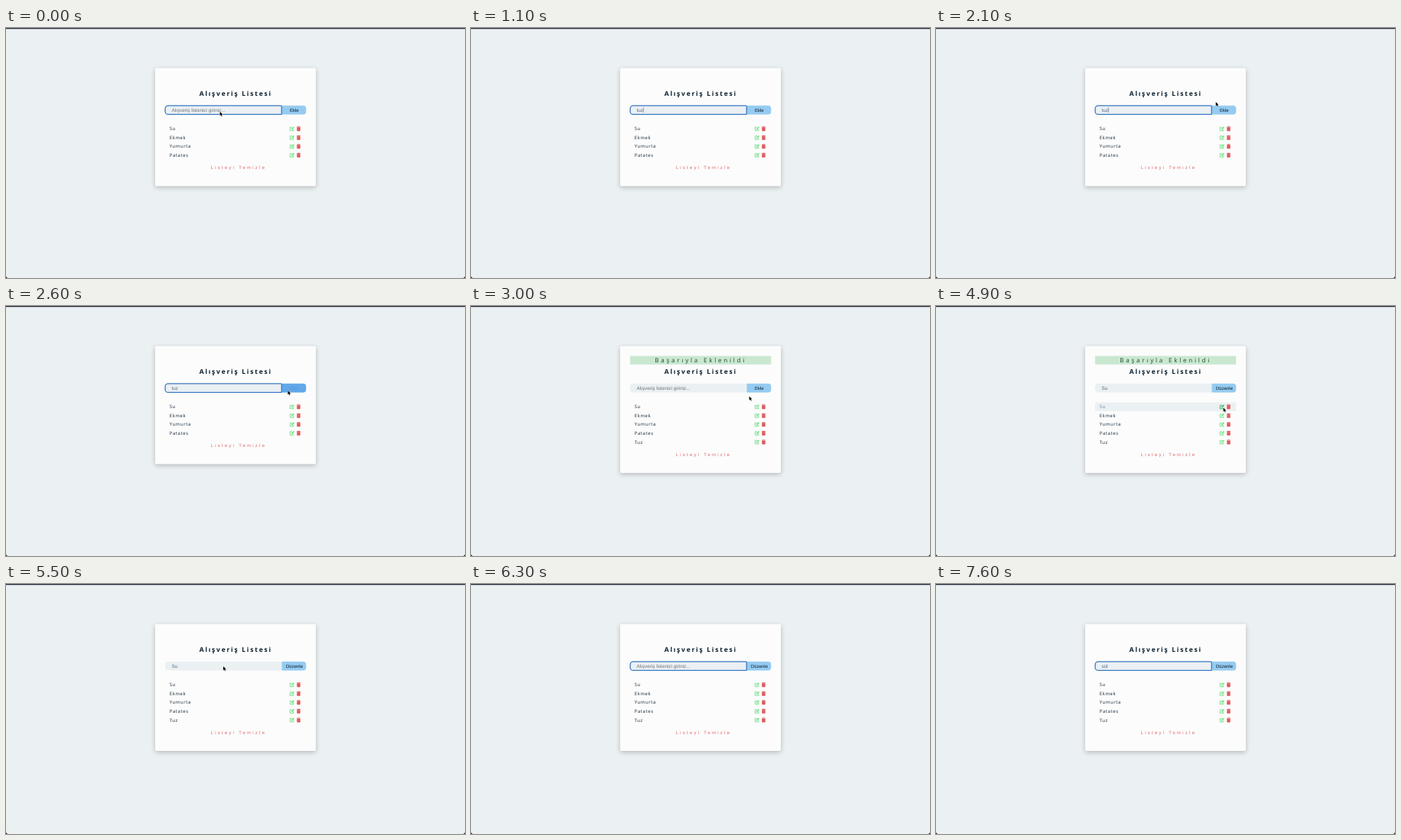
Animation of 600 by 328 pixels, one loop 8 s. Source, as an HTML page with a canvas:

```html
<!DOCTYPE html>
<html lang="tr">
<head>
<meta charset="utf-8">
<title>Alışveriş Listesi</title>
<style>
html, body { margin: 0; width: 100%; height: 100%; overflow: hidden; background: #ebf0f3; }
canvas { display: block; width: 600px; height: 328px; }
</style>
</head>
<body>
<canvas id="stage"></canvas>
<script>
const LOOP = 8000, STEP = 100, ROW = 11.55;
const SANS = '"Open Sans", sans-serif', UI = '"Liberation Sans", Arial, sans-serif';
const ITEMS = ['Su', 'Ekmek', 'Yumurta', 'Patates', 'Tuz'];
const HINT = 'Alışveriş listenizi giriniz...';

// [time, text in the field]
const TYPED = [[0, ''], [800, 't'], [1000, 'tu'], [1100, 'tuz'], [2800, ''], [4800, 'Su'],
  [6100, 'S'], [6200, ''], [6900, 's'], [7000, 'sü'], [7100, 'süt']];

// [time, x, y]; the pointer hides while typing
const PATHS = [
  [[0, 279.6, 109.8], [700, 279.6, 109.8]],
  [[1900, 282, 111], [2200, 395, 92], [2500, 368.4, 111], [2800, 368.4, 111],
   [3100, 362, 121], [3400, 362, 121], [3700, 353.8, 142.6], [3900, 354, 143],
   [4300, 375, 133], [4400, 375.6, 133.4], [5000, 375.6, 133.4], [5500, 284, 108], [6100, 284, 108]]
];

const canvas = document.getElementById('stage');
const c = canvas.getContext('2d');
const dpr = window.devicePixelRatio || 1;
canvas.width = 600 * dpr;
canvas.height = 328 * dpr;

const within = (t, a, b) => t >= a && t < b;

function box(x, y, w, h, r, fill) {
  c.beginPath();
  c.roundRect(x, y, w, h, r);
  c.fillStyle = fill;
  c.fill();
}

function text(str, x, y, size, color, family = UI, spacing = 0, weight = 400) {
  c.font = `${weight} ${size}px ${family}`;
  c.letterSpacing = spacing + 'px';
  c.textRendering = 'geometricPrecision';
  c.fillStyle = color;
  c.fillText(str, x, y);
  return c.measureText(str).width;
}

function typedAt(t) {
  let last = TYPED[0];
  for (const key of TYPED) if (key[0] <= t) last = key;
  return last;
}

function pointerAt(t) {
  const path = PATHS.find(p => within(t, p[0][0], p[p.length - 1][0]));
  if (!path) return null;
  const i = path.findIndex(p => p[0] > t);
  const [t0, x0, y0] = path[i - 1], [t1, x1, y1] = path[i];
  const k = (t - t0) / (t1 - t0), e = k * k * (3 - 2 * k);
  return { x: x0 + (x1 - x0) * e, y: y0 + (y1 - y0) * e };
}

function editIcon(x, y, color) {
  c.strokeStyle = c.fillStyle = color;
  c.lineWidth = 0.75;
  c.beginPath();
  c.moveTo(x + 3.3, y - 2);
  c.lineTo(x + 0.4, y - 2);
  c.lineTo(x + 0.4, y + 2.5);
  c.lineTo(x + 4.9, y + 2.5);
  c.lineTo(x + 4.9, y + 0.6);
  c.stroke();
  c.lineWidth = 1.3;
  c.beginPath();
  c.moveTo(x + 2.2, y + 0.9);
  c.lineTo(x + 5.5, y - 2.3);
  c.stroke();
}

function trashIcon(x, y) {
  const red = '#da4549';
  box(x, y - 2.6, 5, 0.8, 0.2, red);
  box(x + 1.5, y - 3, 2, 0.6, 0.2, red);
  box(x + 0.35, y - 1.5, 4.3, 4.5, [0, 0, 0.6, 0.6], red);
  for (let i = 0; i < 3; i++) box(x + 1.2 + i * 1.1, y - 0.8, 0.35, 3, 0, '#e98b8d');
}

function pointer({ x, y }) {
  const pts = [[0, 0], [0, 5.3], [1.3, 4.2], [2.2, 6.2], [3.1, 5.8], [2.2, 3.9], [3.8, 3.8]];
  c.beginPath();
  pts.forEach(([dx, dy]) => c.lineTo(x + dx, y + dy));
  c.closePath();
  c.lineJoin = 'round';
  c.lineWidth = 0.9;
  c.strokeStyle = '#fff';
  c.stroke();
  c.fillStyle = '#000';
  c.fill();
}

function field(t, mouse) {
  const focus = t < 2800 || t >= 5600;
  const [since, value] = typedAt(t);
  box(208, 101.8, 152.6, 11.8, [4, 0, 0, 4], '#ebf0f3');

  const over = mouse && mouse.x > 360.5 && mouse.x < 392 && within(mouse.y, 102, 113.5);
  box(360.5, 101.8, 31.8, 11.8, [0, 4, 4, 0], over ? '#62a8e8' : '#95cbf2');
  const edit = t >= 4800;
  text(edit ? 'Düzenle' : 'Ekle', edit ? 366 : 370.9, 109.7, 6, over ? '#549bdb' : '#0b1c2b');

  if (focus) {
    c.beginPath();
    c.roundRect(208.1, 101.9, 152.2, 11.5, [4, 1, 1, 4]);
    c.strokeStyle = '#3a7bc2';
    c.lineWidth = 1.3;
    c.stroke();
  }
  const w = text(value || HINT, 216.4, 109.7, 6.35, value ? '#566f88' : '#6b7378');
  const blink = Math.floor((t - since) / 500) % 2 === 0;
  if (focus && value && blink) box(216.5 + w, 104.2, 0.5, 6.8, 0, '#33495c');
}

function list(t, mouse) {
  const count = t >= 2800 ? 5 : 4;
  for (let i = 0; i < count; i++) {
    const y = 132.2 + i * ROW;
    const over = mouse && within(mouse.x, 208, 392) && Math.abs(mouse.y - y) < ROW / 2;
    if (over) box(208, y - ROW / 2, 184.3, ROW, 1.5, '#ebf0f3');
    text(ITEMS[i], 213.7, y + 2.1, 6, over ? '#708396' : '#13283a', SANS, 0.6);
    editIcon(371, y, over && mouse.x > 370 && mouse.x < 378 ? '#219a35' : '#55d968');
    trashIcon(380, y);
  }
  text('Listeyi Temizle', 267.7, 139.2 + count * ROW, 6, '#e0696d', UI, 2.24);
}

function draw(t) {
  const mouse = pointerAt(t);
  c.setTransform(dpr, 0, 0, dpr, 0, 0);
  c.fillStyle = '#000';
  c.fillRect(0, 0, 600, 328);
  box(0, 0, 600, 328, [0, 0, 3, 3], '#ebf0f3');
  box(0, 0, 600, 1.3, 0, '#292a38');

  c.save();
  c.shadowColor = 'rgba(0,0,0,.24)';
  c.shadowBlur = 6 * dpr;
  c.shadowOffsetY = 1.9 * dpr;
  box(195, 52.5, 210, t >= 2800 ? 166.4 : 154.9, 2, '#fcfcfc');
  c.restore();

  if (within(t, 2800, 5500)) {
    box(208, 65.4, 184.3, 11.4, 0.5, '#cae8d0');
    text('Başarıyla Eklenildi', 240.3, 74, 8, '#1d4a2b', SANS, 2.79);
  }
  text('Alışveriş Listesi', 252.8, 89.2, 8.5, '#0b1f2e', SANS, 1.75, 700);
  field(t, mouse);
  list(t, mouse);
  if (mouse) pointer(mouse);
}

const start = performance.now();
function frame() {
  const t = (performance.now() - start) % LOOP;
  draw(Math.floor(t / STEP) * STEP);
  requestAnimationFrame(frame);
}
frame();
</script>
</body>
</html>
```
